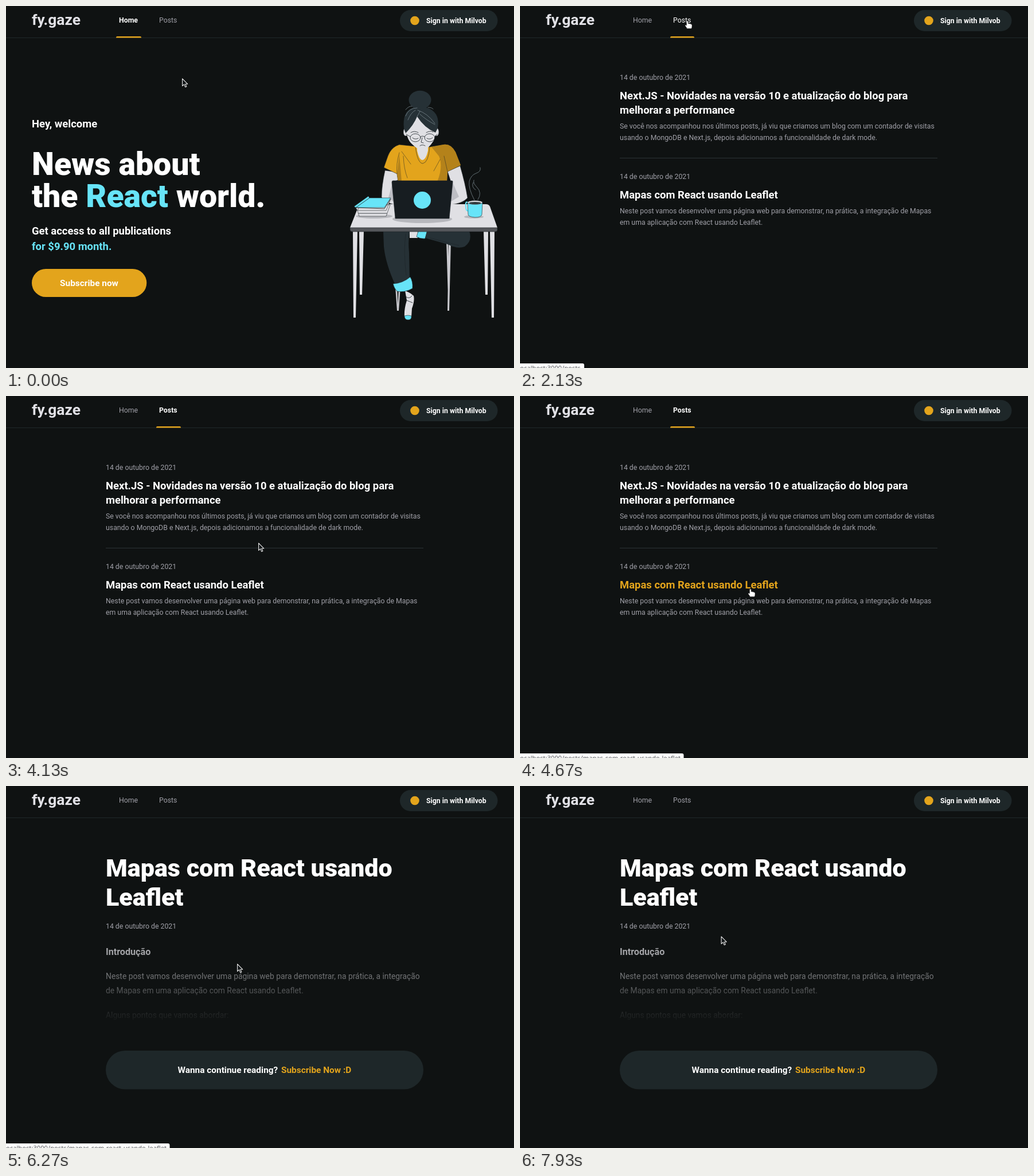
Animation of 886x632 px, one loop 8000 ms. Source, as an HTML page:

```html
<!DOCTYPE html>
<html lang="en">
<head>
<meta charset="utf-8">
<title>Blog walkthrough</title>
<style>
  html, body { margin: 0; width: 100%; height: 100%; overflow: hidden; background: #0f1212; }
  svg { display: block; width: 100vw; height: 100vh; }
  text { font-family: Roboto, sans-serif; font-size: 12.31px; fill: #fff; white-space: pre; }
  .b { font-weight: 700; }
  .g { fill: #a0a0a8; }
  .cy { fill: #67e4f8; }
  .or { fill: #e3a41c; }
  .panel { fill: #1e2729; }
  .m { font-size: 15.4px; }
  .l { font-size: 18.46px; }
  .xl { font-size: 43.1px; font-weight: 900; }
  .xxl { font-size: 55.4px; font-weight: 900; }
  .fade { font-size: 13.85px; fill: url(#fade); }
  .sk { fill: #e0e0e4; }
  .dk { fill: #263136; }
  .ink { fill: none; stroke: #1b2327; stroke-width: .8; stroke-linecap: round; stroke-linejoin: round; }
  .pale { fill: none; stroke: #77858b; stroke-width: .8; stroke-linecap: round; }
  .ed { stroke: #1b2327; stroke-width: .6; stroke-linejoin: round; }
</style>
</head>
<body>
<svg viewBox="0 0 886 632">
  <defs>
    <linearGradient id="fade" gradientUnits="userSpaceOnUse" x1="0" y1="237" x2="0" y2="415">
      <stop offset="0" stop-color="#e1e1e6"/>
      <stop offset="1" stop-color="#e1e1e6" stop-opacity="0"/>
    </linearGradient>
  </defs>
  <rect width="886" height="632" fill="#0f1212"/>

  <!-- header -->
  <path d="M0 55.5H886" stroke="#1f282a"/>
  <text class="b" x="45" y="33" style="font-size:26.4px;fill:#e1e1e6">fy.gaze</text>
  <text id="navHome" x="197" y="29.4">Home</text>
  <text id="navPosts" x="267" y="29.4">Posts</text>
  <path id="bar" class="or"/>
  <rect class="panel" x="687" y="7" width="170.5" height="37" rx="18.5"/>
  <circle class="or" cx="713" cy="25.5" r="7.8"/>
  <text class="b" x="733" y="30.3">Sign in with Milvob</text>

  <g id="home">
    <text class="b l" x="45" y="212.4">Hey, welcome</text>
    <text class="xxl" x="45" y="295.4">News about</text>
    <text class="xxl" x="45" y="350.8">the <tspan class="cy">React</tspan> world.</text>
    <text class="b l" x="45" y="398.7">Get access to all publications</text>
    <text class="b l cy" x="45" y="426.4">for $9.90 month.</text>
    <rect class="or" x="45" y="459" width="200.3" height="49" rx="24.5"/>
    <text class="b m" x="145" y="489" text-anchor="middle">Subscribe now</text>

    <!-- chair and table legs -->
    <path fill="#c9c9ce" d="M679 490h3l2 42h-2ZM685 490h3l-3 42h-2ZM768 410h3l2 100h-2ZM772 410h4l-3 122h-3Z"/>
    <path class="sk" d="M616 393h8l-3 111h-4ZM833 393h8l-1 111h-4Z"/>
    <path class="sk" d="M605 393h8l-3 151h-4ZM844 393h8l-1 151h-4Z"/>

    <!-- legs -->
    <path class="sk" d="M704 393h14v12h-14ZM696 497Q703 500 706 502L711 506Q713 515 708 528L707 543Q702 548 695 543Q694 530 699 514Z"/>
    <path class="ink" d="M698 508Q704 512 708 506M699 514L709 518"/>
    <path class="cy ed" d="M695 541Q701 539 707 541Q708 548 701 548Q695 548 695 541ZM719 393H735L731 406Q723 407 716 403Z"/>
    <path class="dk" d="M734 393H808Q814 410 800 420Q788 425 770 416L731 405ZM658 393H704Q701 410 703 430L704 477Q692 484 679 487Q662 450 659 420Z"/>
    <path class="ink" d="M697 398Q693 430 698 470M740 405Q765 412 790 418" stroke-opacity=".7"/>
    <path class="cy ed" d="M675 485Q692 484 705 473Q710 481 709 493Q695 501 682 498Q677 493 675 485Z"/>

    <!-- arms and shirt -->
    <path class="sk ed" d="M661 287Q655 314 655 334Q663 344 678 347V306L684 304 682 290ZM770 289L792 279Q801 310 805 335Q796 345 775 347V304Z"/>
    <path fill="#bdbec4" d="M675 306L667 334 677 343ZM778 306L790 333 775 342Z"/>
    <path class="or ed" d="M714 245L686 242Q672 246 666 262L659 282 682 293 684 307H769L770 289 793 278 784 255Q776 240 763 242L739 246Z"/>
    <path fill="#b4821a" d="M742 246L763 242Q776 240 784 255L793 278 770 289 769 307H752Q763 280 755 262ZM682 293L686 258 690 306H684Z"/>
    <path class="ink" stroke-opacity=".6" d="M686 256Q680 276 682 293M770 289L764 262M693 262Q694 285 700 300M690 254L706 276M757 268L746 288"/>
    <path class="sk" d="M717 240V252Q720 268 726 269Q733 268 736 252V240Z"/>
    <path class="ink" stroke-opacity=".7" d="M714 246Q718 275 727 275Q737 273 739 246"/>

    <!-- head -->
    <ellipse class="dk" cx="722" cy="164" rx="19.5" ry="16.3"/>
    <ellipse class="sk ed" cx="697" cy="220" rx="4" ry="7"/>
    <ellipse class="sk ed" cx="751" cy="220" rx="4" ry="7"/>
    <path class="sk" d="M697 200Q696 228 706 239Q719 252 726 252Q736 251 746 235Q752 220 751 200L722 188Z"/>
    <path class="dk" d="M694 214Q691 186 707 179Q722 171 740 180Q757 189 753 213L749 221Q730 213 717 193Q711 208 697 222Z"/>
    <path class="pale" d="M697 192Q702 178 717 178M701 199Q706 186 714 182M718 182Q735 187 748 205M722 189Q733 199 748 207M717 193L722 184M697 181Q703 174 708 175M736 177Q743 177 745 180"/>
    <g class="ink">
      <ellipse cx="714" cy="230" rx="9" ry="7"/><ellipse cx="739" cy="230" rx="9" ry="7"/>
      <path d="M723 228Q726 226 730 228M705 228L698 224M748 228L752 224M709 230Q713 234 719 231M734 231Q739 234 744 230M706 221Q712 217 719 221M733 221Q740 217 745 220M726 230L724 238 728 239M722 244Q726 241 731 244"/>
    </g>

    <!-- desk -->
    <path class="sk" d="M625 346H837Q842 346 844 350L857 387H600L613 354Q616 346 625 346Z"/>
    <path fill="#55575b" class="ed" d="M600 387H857V391Q857 394 853 394H604Q600 394 600 390Z"/>
    <ellipse cx="726" cy="372" rx="52" ry="7" fill="#b7b8bd"/>
    <path fill="#171d21" class="ed" d="M675 305H777Q780 305 779 308L773 371H679L673 308Q673 305 675 305Z"/>
    <circle class="cy" cx="726" cy="339" r="15"/>

    <!-- books and mug -->
    <ellipse cx="642" cy="367" rx="32" ry="4" fill="#b7b8bd"/>
    <path class="sk ed" d="M613 357L618 347 670 347 663 367H616ZM609 351L630 338 671 337 663 357H613Z"/>
    <path class="cy ed" d="M607 350L632 332 634 335 671 335 660 352H610Z"/>
    <path class="ink" d="M610 352L660 354 670 338M615 362H664M634 335L610 352"/>
    <ellipse cx="816" cy="368" rx="17" ry="3" fill="#b7b8bd"/>
    <path d="M806 344Q801 339 802 350Q802 359 807 357" fill="none" stroke="#67e4f8" stroke-width="2.2"/>
    <path class="cy ed" d="M805 343H831L830 364Q829 369 818 369Q806 368 806 364Z"/>
    <ellipse class="sk ed" cx="818" cy="343" rx="13" ry="3.4"/>
    <ellipse cx="818" cy="344" rx="10.5" ry="2.1" fill="#30383c"/>
    <path class="pale" d="M817 339Q806 318 808 306Q811 295 820 292Q829 289 827 282M823 338Q831 326 821 316Q814 309 816 304M819 321Q811 316 815 308"/>
  </g>

  <g id="posts">
    <text class="g" x="174" y="129.4">14 de outubro de 2021</text>
    <g id="title1" class="b">
      <text class="l" x="174" y="163.4">Next.JS - Novidades na versão 10 e atualização do blog para</text>
      <text class="l" x="174" y="188">melhorar a performance</text>
    </g>
    <text class="g" x="174" y="214.3">Se você nos acompanhou nos últimos posts, já viu que criamos um blog com um contador de visitas</text>
    <text class="g" x="174" y="234.3">usando o MongoDB e Next.js, depois adicionamos a funcionalidade de dark mode.</text>
    <path d="M174 265.5H728" stroke="#2c3336"/>
    <text class="g" x="174" y="301.7">14 de outubro de 2021</text>
    <g id="title2" class="b"><text class="l" x="174" y="335.7">Mapas com React usando Leaflet</text></g>
    <text class="g" x="174" y="362">Neste post vamos desenvolver uma página web para demonstrar, na prática, a integração de Mapas</text>
    <text class="g" x="174" y="382">em uma aplicação com React usando Leaflet.</text>
  </g>

  <g id="post">
    <text class="xl" x="174" y="158.2">Mapas com React usando</text>
    <text class="xl" x="174" y="208.8">Leaflet</text>
    <text class="g" x="174" y="249.4">14 de outubro de 2021</text>
    <text class="fade b" x="174" y="294.8" style="font-size:16.15px">Introdução</text>
    <text class="fade" x="174" y="337">Neste post vamos desenvolver uma página web para demonstrar, na prática, a integração</text>
    <text class="fade" x="174" y="361.6">de Mapas em uma aplicação com React usando Leaflet.</text>
    <text class="fade" x="174" y="404.6">Alguns pontos que vamos abordar:</text>
    <rect class="panel" x="174" y="462" width="554" height="67.5" rx="33.75"/>
    <text class="b m" x="299.5" y="501">Wanna continue reading?</text>
    <text class="b m or" x="480" y="501">Subscribe Now :D</text>
  </g>

  <g id="status">
    <path id="tip" fill="#fff"/>
    <text id="url" x="-2.9" y="636" style="font-family:'Noto Sans',sans-serif;font-size:11.2px;fill:#5a5c60"></text>
  </g>

  <g id="cursor">
    <path id="arrow" d="M.6 .8V13.6L3.6 10.9 5.7 15.6 7.8 14.7 5.8 10.2H9.7Z" fill="#14181a" stroke="#e8e8e8" stroke-width="1.1" stroke-linejoin="round"/>
    <path id="hand" d="M-1.6 .8Q-.2 -1 1.2 .8V4.6Q2.6 3.9 3.6 5Q5 4.4 5.8 5.5Q7.8 5.2 8 7.4V10Q8 11.4 7 13.4H-.8Q-2 11 -4 8.6Q-4.6 6.8 -2.8 6.9L-1.6 8Z" fill="#fff" stroke="#1a1a1a" stroke-width=".6" stroke-linejoin="round"/>
    <path id="beam" d="M-2.5 -7.5Q0 -7.5 0 -6V6Q0 7.5 -2.5 7.5M2.5 -7.5Q0 -7.5 0 -6M0 6Q0 7.5 2.5 7.5" fill="none" stroke="#e0e0e0"/>
  </g>
</svg>
<script>
const LOOP = 8000, TICK = 200 / 3;
const $ = id => document.getElementById(id);
const show = (id, on) => $(id).style.display = on ? '' : 'none';

// pointer moves: start, end, x, y
const moves = [
  [66, 133, 307, 127], [467, 600, 304, 140], [600, 733, 406, 200],
  [800, 867, 526, 125], [867, 933, 436, 57], [1067, 1333, 306, 19],
  [1333, 1600, 292, 26], [2667, 2733, 311, 27], [2800, 2933, 429, 40],
  [3067, 3133, 447, 49], [3200, 3333, 472, 56], [3400, 3467, 477.5, 59],
  [3600, 3733, 445, 123], [3800, 3933, 441, 165], [4067, 4133, 440, 256],
  [4200, 4600, 402, 337], [4800, 5000, 415, 330], [5533, 6000, 402, 318],
  [6133, 6200, 403, 310], [6400, 6800, 387, 327], [7067, 7133, 387, 329],
  [7267, 7333, 387, 336], [7400, 7600, 411, 384], [7733, 7933, 350.5, 262]
];

// status bubble: start, fade start, fade end, width, address
const tips = [
  [1330, 3070, 3270, 112, 'localhost:3000/posts'],
  [4530, 6470, 6670, 285.5, 'localhost:3000/posts/mapas-com-react-usando-leaflet']
];

function pointer(t) {
  let x = 307, y = 126;
  for (const [t0, t1, nx, ny] of moves) {
    if (t <= t0) break;
    const p = Math.min(1, (t - t0) / (t1 - t0)), e = p * p * (3 - 2 * p);
    x += (nx - x) * e;
    y += (ny - y) * e;
  }
  return [x, y];
}

function nav(id, active, hover, bold = active) {
  $(id).style.fill = active || hover ? '#fff' : '#a0a0a8';
  $(id).style.fontWeight = bold ? 700 : 400;
}

function render(time) {
  const t = Math.floor((time + 4) / TICK) * TICK;
  const page = t < 2130 ? 'home' : t < 6199 ? 'posts' : 'post';
  for (const id of ['home', 'posts', 'post']) show(id, id === page);

  const [x, y] = pointer(t);
  const over = (x0, y0, x1, y1) => x >= x0 && x <= x1 && y >= y0 && y <= y1;
  const onNav = over(262, 8, 314, 50);
  const on1 = page === 'posts' && over(174, 146, 677, 192);
  const on2 = page === 'posts' && over(174, 317, 450, 342);

  nav('navHome', page === 'home', false);
  nav('navPosts', page === 'posts', onNav, page === 'posts' && t > 2190);
  show('bar', page !== 'post');
  const [bx, bw] = page === 'home' ? [192, 44] : [262, t > 2190 ? 43 : 42];
  $('bar').setAttribute('d', `M${bx} 55.5V55Q${bx} 53 ${bx + 2} 53H${bx + bw - 2}Q${bx + bw} 53 ${bx + bw} 55V55.5Z`);
  [on1, on2].forEach((on, i) => {
    for (const el of $('title' + (i + 1)).children) el.style.fill = on ? '#e3a41c' : '#fff';
  });

  const tip = tips.find(([a, , b]) => t >= a && t < b);
  show('status', tip);
  if (tip) {
    const [, f0, f1, w, url] = tip;
    $('status').style.opacity = Math.min(1, (f1 - t) / (f1 - f0));
    $('tip').setAttribute('d', `M0 624H${w - 3}Q${w} 624 ${w} 627V632H0Z`);
    $('url').textContent = url;
  }

  const hand = onNav || on1 || on2;
  const beam = page === 'post' && over(174, 320, 722, 370);
  show('hand', hand);
  show('beam', beam);
  show('arrow', !hand && !beam);
  $('cursor').setAttribute('transform', `translate(${Math.round(x * 2) / 2} ${Math.round(y * 2) / 2})`);
}

function frame() {
  render(performance.now() % LOOP);
  requestAnimationFrame(frame);
}
frame();
</script>
</body>
</html>
```
